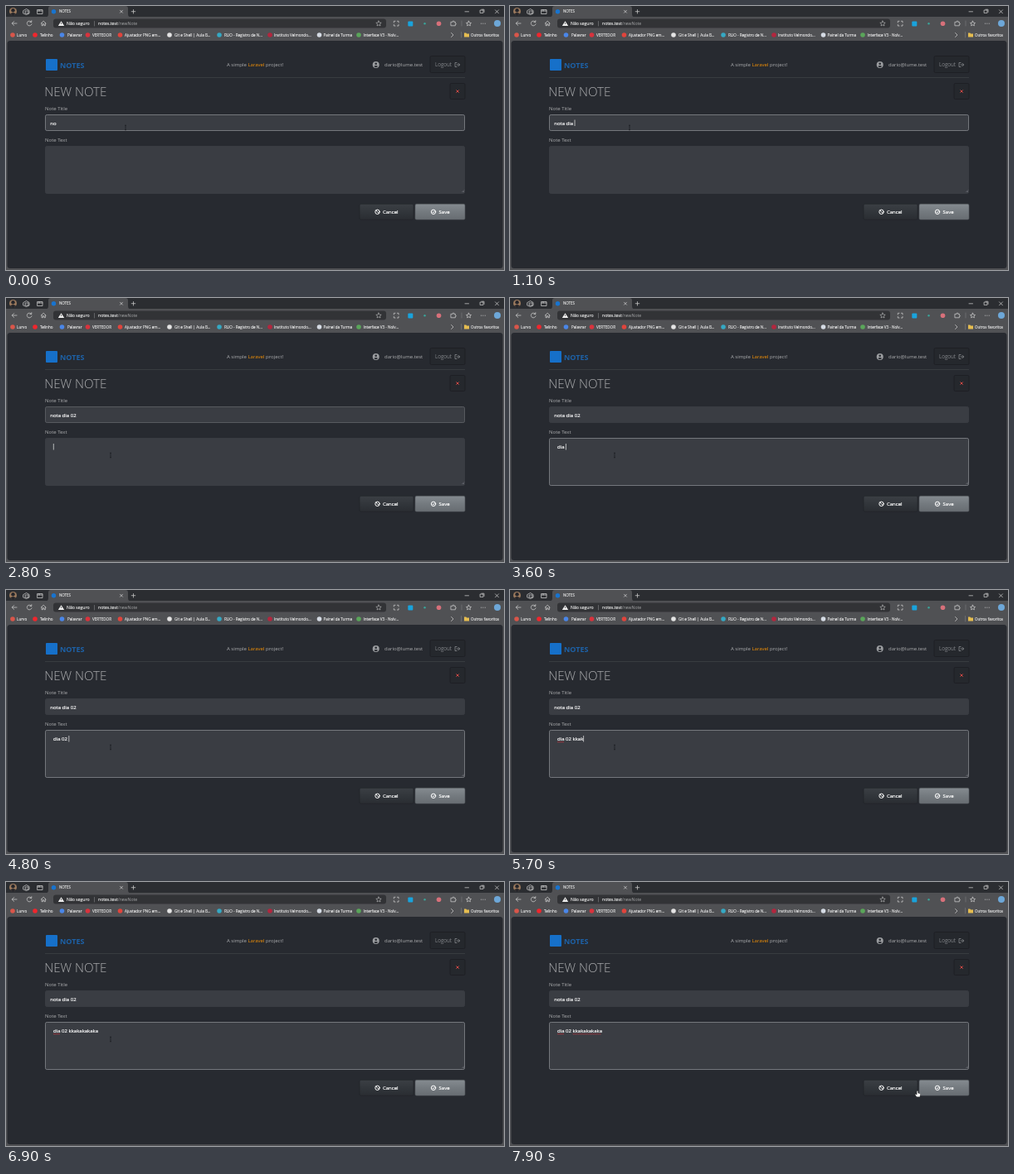
Write an HTML page that moves like this. It is 600x319 px and loops after 8000 ms.

```html
<!DOCTYPE html>
<html lang="pt">
<head>
<meta charset="utf-8">
<title>NOTES</title>
<style>
  html, body { margin: 0; height: 100%; overflow: hidden; background: #505154; }
  svg { display: block; width: 100vw; height: 100vh; }
  text { font: 6px "Open Sans", "Noto Sans", sans-serif; fill: #aeafb1; white-space: pre; }
  .bar text { font-size: 4.6px; fill: #f2f2f2; stroke: #f2f2f2; stroke-width: .1; }
  .bar .url { font-size: 5.15px; }
  .bar .dim { fill: #a6a7a9; stroke: none; }
  .line { fill: none; stroke: #d4d4d4; stroke-width: .7; stroke-linecap: round; stroke-linejoin: round; }
  .typed { fill: #fff; stroke: #fff; stroke-width: .18; }
  .wavy { fill: none; stroke: #d8333d; stroke-width: .6; }
</style>
</head>
<body>
<svg viewBox="0 0 600 319" preserveAspectRatio="none">
  <defs>
    <linearGradient id="cancel" x2="0" y2="1"><stop stop-color="#3b3f44"/><stop offset=".6" stop-color="#303439"/><stop offset="1" stop-color="#2a2d32"/></linearGradient>
    <linearGradient id="save" x2="0" y2="1"><stop stop-color="#858b90"/><stop offset=".5" stop-color="#747a7f"/><stop offset="1" stop-color="#686d72"/></linearGradient>
  </defs>

  <g class="bar">
    <path d="M0 0H600V13H0z" fill="#2b2d31"/>
    <path d="M49 13.5Q51 13 51 10V3Q51 0 54 0H144Q147 0 147 3V10Q147 13 149 13.5z" fill="#505154"/>
    <rect x="57" y="15.5" width="401" height="11" rx="3" fill="#323336"/>
    <!-- profile silhouette -->
    <circle cx="8.5" cy="6.5" r="4.5" fill="#9a795d"/>
    <path d="M5 9.6Q8.5 6.2 12 9.6Q8.5 13 5 9.6z" fill="#25252a"/>
    <circle cx="8.5" cy="5.2" r="2.2" fill="#25252a"/>
    <circle cx="57.5" cy="6.7" r="2.7" fill="#1874cf"/>
    <text x="64" y="8.4" style="font-size:4.4px">NOTES</text>
    <g class="line">
      <path d="M21 5.5L24.5 3.5L28 5.5V9L24.5 10.5L21 9zM23.5 6H27V9H23.5z"/>
      <path d="M38 4.5H44V9.5H38zM38 6H44M40 4.5V6"/>
      <path d="M137.5 5.2L140.5 8.2M140.5 5.2L137.5 8.2M153.5 4.5V9M151.2 6.7H155.8"/>
      <path d="M553 6.8H557.5M571.5 5H575V8.4H571.5zM573 4.2H576V7.4M589.5 4.8L593.5 8.8M593.5 4.8L589.5 8.8"/>
      <path d="M13 21H7.3M9.6 18.6L7.2 21L9.6 23.4"/>
      <path d="M30.5 19.2A2.9 2.9 0 1 0 31 21.8M30.8 17.6V19.5H28.9"/>
      <path d="M42.3 21L45.2 18.2L48.1 21M43 20.5V23.7H44.4V21.8H46V23.7H47.4V20.5"/>
      <path d="M449 18L450 20.1L452.2 20.3L450.5 21.8L451 24L449 22.8L447 24L447.5 21.8L445.8 20.3L448 20.1z" stroke-width=".5"/>
      <path d="M467.3 20V18.3H469M471.5 18.3H473V20M473 22.5V24H471.5M469 24H467.3V22.5"/>
      <path d="M536.3 19.3H538.3Q538.3 17.5 539.4 18Q540.2 18.5 539.8 19.3H541.3V21Q542.5 20.9 542.4 22Q542 22.8 541.3 22.3V23.8H536.3z"/>
      <path d="M557.5 18.2L558.5 20.2L560.5 20.5L559 21.8L559.4 23.8L557.5 22.8L555.6 23.8L556 21.8L554.5 20.5L556.5 20.2z"/>
      <path d="M536.5 32.5L539 35L536.5 37.5"/>
      <path d="M106.5 18.5V24M549 18V24M548.5 31.5V38" style="stroke:#77797c"/>
    </g>
    <path d="M66.5 18.3L70.2 24H62.8z" fill="#eee"/>
    <path d="M66.5 20.2V22" stroke="#333" stroke-width=".7"/>
    <rect x="484.3" y="18.5" width="6" height="6" rx="1" fill="#19a3dc"/>
    <circle cx="504.5" cy="21.2" r="1.2" fill="#3aa59a"/>
    <circle cx="521.5" cy="21.2" r="2.8" fill="#d7707a"/>
    <path d="M572.4 21.2h.01M574.8 21.2h.01M577.2 21.2h.01" stroke="#d8d8d8" stroke-linecap="round"/>
    <circle cx="592" cy="21" r="4" fill="#6da7d8"/>
    <text class="url" x="73" y="23">Não seguro</text>
    <text class="url" x="111" y="23">notes.test<tspan class="dim">/newNote</tspan></text>
    <g id="marks"></g>
    <path d="M552 32.5H554.3L555.2 33.4H558V37.4H552z" fill="#e5bd50"/>
    <text x="560" y="36.7" style="font-size:4.5px">Outros favoritos</text>
  </g>

  <rect x="1.5" y="42" width="597" height="275" rx="3.5" fill="#272a30"/>
  <rect x="48" y="64" width="14" height="14" rx="1" fill="#1670c9"/>
  <text x="65" y="75.3" style="font-size:9px;font-weight:700;fill:#1d62a8">NOTES</text>
  <text x="266" y="73.2">A simple <tspan fill="#f89406">Laravel</tspan> project!</text>
  <circle cx="445.7" cy="71" r="4" fill="#9c9ea1"/>
  <circle cx="445.7" cy="69.7" r="1.3" fill="#272a30"/>
  <path d="M443.2 73.1Q445.7 70.8 448.2 73.1Q445.7 75.3 443.2 73.1z" fill="#272a30"/>
  <text x="456" y="73.2">dario@lume.test</text>
  <g fill="#25282d" stroke="#1c1e22" stroke-width=".8">
    <rect x="511" y="60.5" width="42" height="20" rx="1.5"/>
    <rect x="535" y="93.5" width="18" height="19" rx="1.5"/>
  </g>
  <text x="517" y="73.2" style="font-size:6.2px;fill:#83868a">Logout</text>
  <path class="line" style="stroke:#94979a" d="M543 68.5H541V73.5H543M543 71H546.5M545 69.3L546.7 71L545 72.7"/>
  <path d="M47 86.5H553" stroke="#3d4045" stroke-width=".8"/>
  <text x="46.2" y="109" style="font-size:15.2px;font-weight:300">NEW NOTE</text>
  <path d="M542.5 101.5L545.7 104.7M545.7 101.5L542.5 104.7" stroke="#e04b46" stroke-width="1"/>
  <text x="47" y="126.2">Note Title</text>
  <text x="47" y="164.2">Note Text</text>
  <g fill="#3a3d43">
    <rect id="titleBox" x="47.5" y="131.5" width="505" height="19" rx="1.7"/>
    <rect id="noteBox" x="47.5" y="169.5" width="505" height="57" rx="1.7"/>
  </g>
  <path d="M549.5 225L552 222.5M551 225L552 224" stroke="#92959a" stroke-width=".5"/>
  <rect x="426" y="239.3" width="65" height="18.8" rx="1.7" fill="url(#cancel)" stroke="#202328" stroke-width=".6"/>
  <rect x="493" y="239.3" width="60" height="18.8" rx="1.7" fill="url(#save)" stroke="#55595e" stroke-width=".6"/>
  <g class="line" style="stroke:#fff;stroke-width:1">
    <circle cx="447.5" cy="248.8" r="2.7"/><path d="M445.7 247L449.3 250.6"/>
    <circle cx="515" cy="248.8" r="2.7"/><path d="M513.7 248.9L514.7 249.9L516.4 247.9"/>
  </g>
  <text class="typed" x="454" y="251">Cancel</text>
  <text class="typed" x="521.5" y="251">Save</text>

  <text id="title" class="typed" x="53.3" y="143.5"></text>
  <text id="note" class="typed" x="57" y="181.8"></text>
  <path id="wave1" class="wavy"/>
  <path id="wave2" class="wavy"/>
  <path id="caret" stroke="#eee" stroke-width=".7"/>

  <g id="pointer">
    <path id="beam" d="M-1 -2.8H1M0 -2.8V2.8M-1 2.8H1" fill="none" stroke="#141518" stroke-width=".6"/>
    <path id="arrow" d="M0 0V7L1.7 5.5L2.8 8L3.9 7.5L2.8 5.1H5z" fill="#fff" stroke="#111" stroke-width=".4"/>
    <path id="hand" d="M-.9 -3.3Q0 -4.2 .7 -3.3V-.9L3 -.4Q3.7 0 3.5 1L2.8 3.8H-1L-3 .9Q-2.8 -.2 -1.7 .4L-.9 1z" fill="#fff" stroke="#111" stroke-width=".4"/>
  </g>
</svg>
<script>
const $ = id => document.getElementById(id);

// icon x, text x, icon colour, label
const bookmarks = [
  [8, 13, '#d9564a', 'Lurvo'],
  [35, 41, '#f0262d', 'Telinho'],
  [67.5, 74, '#4a86e8', 'Palavrar'],
  [98.5, 104, '#d8333d', 'VERTEDOR'],
  [137.5, 143, '#e0443c', 'Ajustador PNG em...'],
  [197, 203, '#e4e4e4', 'Git e Shell | Aula B...'],
  [257, 263, '#35a9c4', 'RUO - Registro de N...'],
  [318, 323, '#b3263e', 'Instituto Velmondo...'],
  [377.5, 382.5, '#d5dbe4', 'Painel da Turma'],
  [425, 430.5, '#5aa65a', 'Interface V3 - Nolv...'],
];
$('marks').innerHTML = bookmarks.map(([cx, x, color, label]) =>
  `<circle cx="${cx}" cy="35" r="2.8" fill="${color}"/><text x="${x}" y="36.7">${label}</text>`).join('');

const LOOP = 8000;
const titleText = 'nota dia 02', noteText = 'dia 02 kkakakakaka';
const titleKeys = [0, 0, 300, 500, 600, 700, 800, 1000, 1100, 1600, 1700];
const noteKeys = [3200, 3400, 3500, 3600, 4100, 4200, 4300, 5300, 5500, 5600, 5700,
  5800, 5900, 6000, 6100, 6200, 6200, 6300];
const caretOn = [[300, 2200], [2700, 6800], [7300, 7800]];
// time, x, y
const path = [[0, 144, 147], [2600, 144, 147], [2700, 132, 176], [2800, 126, 190],
  [7200, 126, 190], [7300, 220, 214], [7400, 380, 254], [7500, 484, 269],
  [7700, 484, 269], [7800, 489, 262], [7900, 491, 256], [LOOP, 491, 256]];

const clamp = v => Math.max(0, Math.min(1, v));
const typed = (text, keys, t) => text.slice(0, keys.filter(k => k <= t).length);
const mix = (a, b, k) => `rgb(${a.map((v, i) => v + (b[i] - v) * k)})`;
const show = (id, on) => $(id).style.display = on ? '' : 'none';

function pointerAt(t) {
  const i = Math.max(1, path.findIndex(p => p[0] >= t));
  const [a, b] = [path[i - 1], path[i]], k = (t - a[0]) / (b[0] - a[0]);
  return [a[1] + (b[1] - a[1]) * k, a[2] + (b[2] - a[2]) * k];
}

function wave(id, x, end) {
  let d = `M${x} 183.4`;
  for (let i = 1; x + i <= end; i++) d += `L${x + i} ${183.4 + i % 2 * .6}`;
  $(id).setAttribute('d', d);
}
wave('wave1', 57, 65);
wave('wave2', 75.5, 110);

function draw(now) {
  const t = Math.floor(now % LOOP / 100) * 100;
  $('title').textContent = typed(titleText, titleKeys, t);
  $('note').textContent = typed(noteText, noteKeys, t);

  const focused = [116, 119, 124], idle = [57, 60, 66];
  $('titleBox').setAttribute('stroke', mix(focused, idle, clamp((t - 2600) / 400)));
  $('noteBox').setAttribute('stroke', mix(idle, focused, clamp((t - 2800) / 200)));

  const inNote = t >= 2700, field = $(inNote ? 'note' : 'title');
  const x = (inNote ? 57 : 53.3) + field.getComputedTextLength() + .3, y = inNote ? 176 : 137.5;
  $('caret').setAttribute('d', `M${x} ${y}v7.5`);
  show('caret', caretOn.some(([a, b]) => t >= a && t < b));

  show('wave1', t >= 5300);
  show('wave2', t >= 7300);

  const [px, py] = pointerAt(t);
  $('pointer').setAttribute('transform', `translate(${px} ${py})`);
  const beam = py < 227, hand = px > 426 && py > 239 && py < 258;
  show('beam', beam);
  show('hand', hand);
  show('arrow', !beam && !hand);
  requestAnimationFrame(() => draw(performance.now() - start));
}
const start = performance.now();
draw(0);
</script>
</body>
</html>
```
